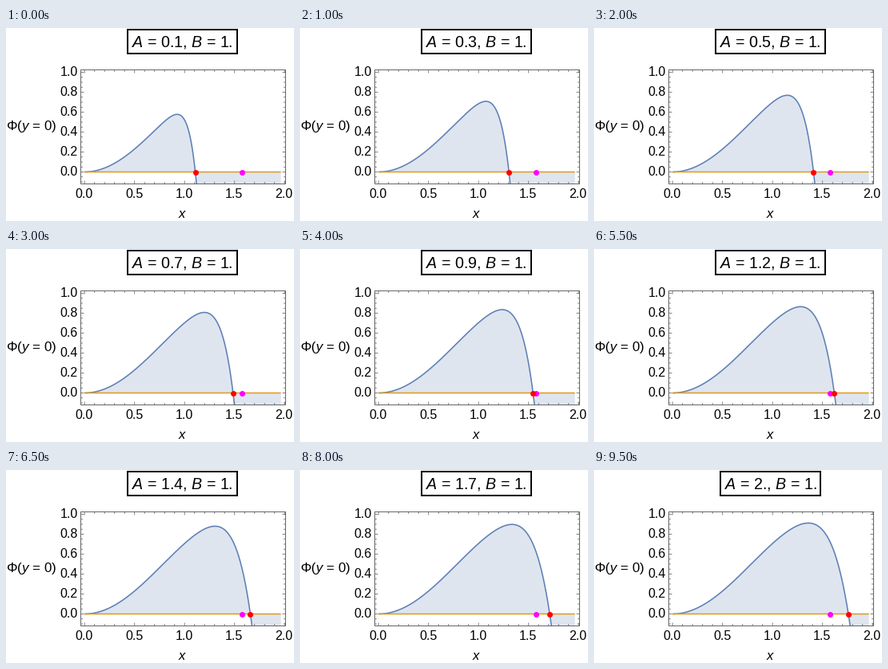
A matplotlib script for the animation above (10 s loop, 360x242 px).

```python
import numpy as np
import matplotlib.pyplot as plt
from matplotlib.animation import FuncAnimation
from matplotlib.patches import Rectangle

plt.rcParams.update({
    "font.family": "Liberation Sans",
    "mathtext.fontset": "custom",
    "mathtext.rm": "Liberation Sans",
    "mathtext.it": "Liberation Sans:italic",
    "path.snap": False,
})

WIDTH, HEIGHT, DPI = 360, 242, 100
FRAMES, INTERVAL = 20, 500
PT = 72 / DPI
UNIT = 125
LEFT, RIGHT, TOP, BOTTOM = 93.5, 349.5, 52.5, 195.5
X_MAX = 1.25 * np.pi / 2
B = 1.0
BLUE, ORANGE, FILL, GRAY = "#5e81b5", "#e19c24", "#dfe5ef", "#666666"


def px(x):
    return 98.2 + UNIT * x


def py(y):
    return 180.5 - UNIT * y


def phi(x, a):
    ratio = B / a * np.tan(x / 2)**4 * np.sin(x)**3.4
    return np.sin(x)**2 * (1 - ratio**1.9)


def zero_crossing(a):
    lo, hi = 0.5, X_MAX
    for _ in range(40):
        mid = (lo + hi) / 2
        lo, hi = (mid, hi) if phi(mid, a) > 0 else (lo, mid)
    return lo


def number(v):
    return f"{v:.1f}".removesuffix("0")


fig = plt.figure(figsize=(WIDTH / DPI, HEIGHT / DPI), dpi=DPI, facecolor="white")
ax = fig.add_axes([0, 0, 1, 1])
ax.set(xlim=(0, WIDTH), ylim=(HEIGHT, 0))
ax.axis("off")


def label(x, y, text, size=16, ha="center"):
    return ax.text(x, y, text, fontsize=size * PT, ha=ha, va="baseline", zorder=8)


def line(xs, ys, color, width, zorder):
    return ax.plot(xs, ys, color=color, lw=width * PT, zorder=zorder,
                   solid_capstyle="butt", snap=False)[0]


def dot(x, color, zorder):
    return ax.plot([px(x)], [py(0)], "o", ms=7 * PT, mew=0, color=color,
                   zorder=zorder, snap=False)[0]


def box(x, y, w, h, color, width, zorder):
    return ax.add_patch(Rectangle((x, y), w, h, fill=False, ec=color, snap=False,
                                  lw=width * PT, zorder=zorder))


frame = box(LEFT, TOP, RIGHT - LEFT, BOTTOM - TOP, GRAY, 1, 5)

for i in range(21):
    major = i % 5 == 0
    size = 4 if major else 2.5
    x = px(i / 10)
    line([x, x], [BOTTOM, BOTTOM - size], GRAY, 0.8, 5)
    line([x, x], [TOP, TOP + size], GRAY, 0.8, 5)
    if major:
        label(x - 0.4, 213, f"{i / 10:.1f}")

for i in range(-2, 21):
    major = i % 4 == 0
    size = 4 if major else 2.5
    y = py(i / 20)
    line([LEFT, LEFT + size], [y, y], GRAY, 0.8, 5)
    line([RIGHT, RIGHT - size], [y, y], GRAY, 0.8, 5)
    if major:
        label(89.7, y + 4.8, f"{i / 20:.1f}", ha="right")

label(0, 128, r"Φ($\mathit{y}$ = 0)", 17, "left")
label(220.5, 238, r"$\mathit{x}$", 16.5)

xs = np.linspace(0, X_MAX, 600)
area = ax.fill(px(xs), py(0 * xs), color=FILL, lw=0, zorder=1)[0]
curve = line([], [], BLUE, 1.6, 3)
for artist in (area, curve):
    artist.set_clip_path(frame)
line([px(0), px(X_MAX)], [py(0)] * 2, ORANGE, 1.6, 4)
dot(np.pi / 2, "magenta", 6)
root = dot(0, "red", 7)
title = label(220.5, 24, "", 19.7)
title_box = box(0, 2, 0, 30, "black", 2, 8)


def update(i):
    a = (i + 1) / 10
    ys = phi(xs, a)
    curve.set_data(px(xs), py(ys))
    outline_x = np.concatenate([xs, [X_MAX, 0]])
    outline_y = np.concatenate([ys, [0, 0]])
    area.set_xy(np.column_stack([px(outline_x), py(outline_y)]))
    root.set_data([px(zero_crossing(a))], [py(0)])
    title.set_text(rf"$\mathit{{A}}$ = {number(a)}, $\mathit{{B}}$ = {number(B)}")
    width = 125 if number(a).endswith(".") else 137
    title_box.set_x(220.5 - width / 2)
    title_box.set_width(width)
    return area, curve, root, title, title_box


anim = FuncAnimation(fig, update, frames=FRAMES, interval=INTERVAL,
                     repeat=True, repeat_delay=0, blit=False)
plt.show()
```
